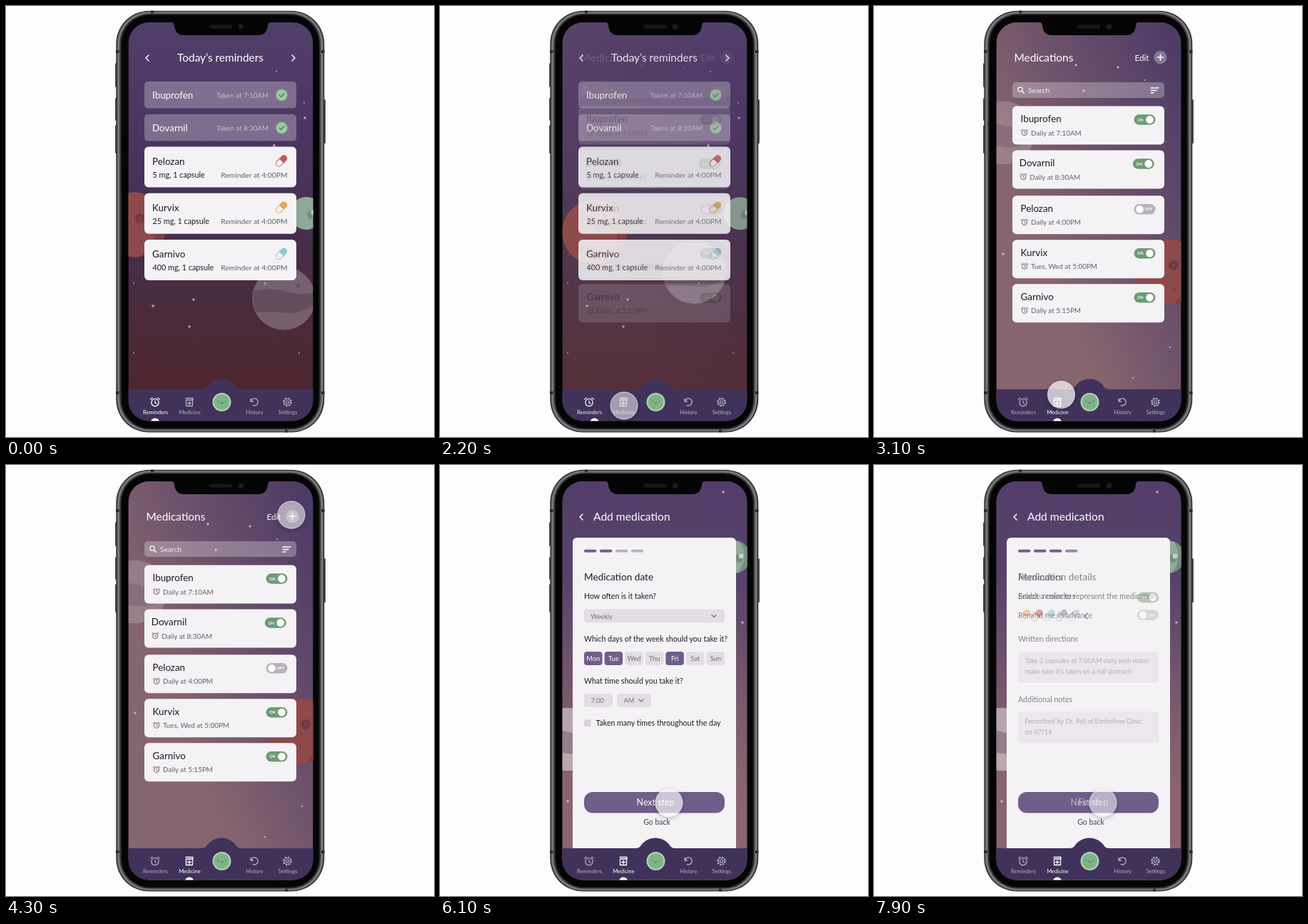
Animation, 600 px wide and 605 px high, one loop 8 s. Source, as an HTML page:

```html
<!DOCTYPE html>
<html lang="en">
<head>
<meta charset="utf-8">
<title>Medication reminders</title>
<style>
html, body { margin: 0; width: 100%; height: 100%; overflow: hidden; background: #fefcfe; }
svg { display: block; width: 600px; height: 605px; font-family: Lato, "Open Sans", sans-serif; }
.line { fill: none; stroke-linecap: round; stroke-linejoin: round; }
</style>
</head>
<body>
<svg id="stage" viewBox="0 0 600 605"></svg>
<script>
const PURPLE = '#715d8b', INK = '#1f1b22', GREY = '#655f69', FIELD = '#e3dde4', CARD = '#f4f2f5';

// Drawing helpers, each returning markup
const text = (x, y, s, size, fill = INK, extra = '') =>
  `<text x="${x}" y="${y}" font-size="${size}" fill="${fill}" ${extra}>${s}</text>`;
const mid = 'text-anchor="middle"', end = 'text-anchor="end"';
const box = (x, y, w, h, r, fill, extra = '') =>
  `<rect x="${x}" y="${y}" width="${w}" height="${h}" rx="${r}" fill="${fill}" ${extra}/>`;
const dot = (x, y, r, fill, extra = '') =>
  `<circle cx="${x}" cy="${y}" r="${r}" fill="${fill}" ${extra}/>`;
const line = (d, color, w = 1.2) =>
  `<path class="line" d="${d}" stroke="${color}" stroke-width="${w}"/>`;
const at = (x, y, body, extra = '') => `<g transform="translate(${x} ${y}) ${extra}">${body}</g>`;
const group = (id, body) => `<g id="${id}">${body}</g>`;

const chevron = (x, y, dir, color = '#fff') =>
  line(`M${x - 2 * dir} ${y - 4}l${4 * dir} 4l${-4 * dir} 4`, color, 1.5);
const drop = (x, y) => line(`M${x - 3} ${y - 1.5}l3 3l3-3`, '#716a76', 1.1);
const pill = (x, y, color) => at(x, y,
  line('M-4.2-1V5a4.2 4.2 0 0 0 8.4 0V-1', color, 1) +
  `<path d="M-4.7 0V-5a4.7 4.7 0 0 1 9.4 0V0z" fill="${color}"/>`, 'rotate(45)');
const alarm = (x, y, color, k = 1) => at(x, y,
  dot(0, .5, 4.7, 'none', `stroke="${color}" stroke-width="1.2"`) +
  line('M0-2V1L2 2M-6-3.3L-3.5-5.5M6-3.3L3.5-5.5', color, 1.1), `scale(${k})`);
const toggle = (x, y, on) => box(x, y - 7.2, 30, 14.4, 7.2, on ? '#6f9a76' : '#b7b2ba') +
  dot(on ? x + 22 : x + 8, y, 5.4, '#fff') +
  text(on ? x + 9 : x + 20.5, y + 2, on ? 'ON' : 'OFF', 5.4, '#fff', mid + ' font-weight="700"');
const field = (x, y, w, s, h = 18.7) => box(x, y, w, h, 4, FIELD) + text(x + 9.5, y + 13, s, 9.2, '#777079');
const title = s => text(202, 162, s, 13.6);
const label = (y, s, size = 10.6) => text(202, y, s, size);
const stars = list => list.map(([x, y, r = 1.4]) => dot(x, y, r, '#d8c9dc', 'opacity=".75"')).join('');
const gradient = (id, dir, ...stops) => `<linearGradient id="${id}" ${dir}>` +
  stops.map((c, i) => `<stop offset="${i / (stops.length - 1)}" stop-color="${c}"/>`).join('') + '</linearGradient>';
const screen = fill => box(171.5, 23, 259, 560, 0, `url(#${fill})`);

const meds = ['Ibuprofen', 'Dovarnil', 'Pelozan', 'Kurvix', 'Garnivo'];

// Reminders screen
const taken = (i, time) => {
  const y = 106 + 46 * i;
  return box(194, y, 213, 37.6, 5, '#fff', 'fill-opacity=".28"') + text(205, y + 24, meds[i], 13.4, '#fff') +
    text(368, y + 23, 'Taken at ' + time, 9.75, '#cabfd0', end) + dot(386.5, y + 19, 8, '#9dc8a2') +
    line(`M383 ${y + 19}l2.5 2.7l4.8-5`, '#43634f', 1.1);
};
const due = (i, dose, color) => {
  const y = 197.5 + 65.2 * (i - 2);
  return box(194, y, 213, 57, 6, CARD) + text(205, y + 25, meds[i], 13.4) +
    text(205.5, y + 43.5, dose + ', 1 capsule', 10.8) +
    text(394.5, y + 43.5, 'Reminder at 4:00PM', 10.3, GREY, end) + pill(386, y + 20, color);
};
const reminders = chevron(198, 73, -1) + chevron(403, 73, 1) +
  text(300.5, 78, 'Today’s reminders', 15.4, '#fff', mid) +
  taken(0, '7:10AM') + taken(1, '8:30AM') +
  due(2, '5 mg', '#c6575c') + due(3, '25 mg', '#e3a95f') + due(4, '400 mg', '#96c6cd');

// Medication list
const schedule = ['Daily at 7:10AM', 'Daily at 8:30AM', 'Daily at 4:00PM', 'Tues, Wed at 5:00PM', 'Daily at 5:15PM'];
const medicine = text(196.5, 78, 'Medications', 15.4, '#fff') + text(365.5, 76.5, 'Edit', 11.7, '#fff') +
  dot(401.5, 72, 9.2, '#fff', 'fill-opacity=".3"') + line('M397.5 72h8M401.5 68v8', '#fff', 1.6) +
  box(194, 107, 213, 22, 5, '#fff', 'fill-opacity=".28"') +
  dot(205, 117, 3.2, 'none', 'stroke="#fff" stroke-width="1.3"') + line('M207.5 119.5l3 3', '#fff', 1.4) +
  text(216, 122, 'Search', 10.3, '#f2edf4') + line('M388 115h11M388 118.5h8M388 122h4', '#fff', 1.3) +
  [140.5, 202.5, 266.3, 328.2, 390.3].map((y, i) => {
    const dx = i == 1 ? -1.7 : 0;
    return box(194, y, 213, 54, 6, CARD) + text(205.5 + dx, y + 22.6, meds[i], 13.4) +
      alarm(211 + dx, y + 37, GREY, .8) + text(220 + dx, y + 41, schedule[i], 9.9, GREY) +
      toggle(364.5 + dx, y + 19, i != 2);
  }).join('');

// Add-medication wizard
const step = [
  title('Medication name') + label(188, 'What’s the name of your medication?') + field(202, 202.5, 197, 'Acetaminophen') +
  label(248, 'How much medication should you take?') +
  field(202, 262.5, 37, '2') + field(246, 262.5, 78, 'Capsules') + drop(312, 272),

  title('Medication date') + label(188, 'How often is it taken?') + field(202, 202.5, 197, 'Weekly') + drop(384, 212) +
  label(248, 'Which days of the week should you take it?') +
  ['Mon', 'Tue', 'Wed', 'Thu', 'Fri', 'Sat', 'Sun'].map((d, i) => {
    const on = [0, 1, 4].includes(i), x = 202 + 28.6 * i;
    return box(x, 262, 25.5, 19, 4, on ? PURPLE : FIELD) + text(x + 12.7, 275, d, 9.2, on ? '#fff' : '#777079', mid);
  }).join('') +
  label(306.5, 'What time should you take it?') + field(202, 321, 40, '7:00') + field(248, 321, 48, 'AM') + drop(282, 330.5) +
  box(202, 357.5, 9.5, 9.5, 2, '#d9d2dc') + text(218.5, 365.5, 'Taken many times throughout the day', 10.6),

  title('Medication details') + label(188, 'Select a color to represent the medication') +
  ['#e3a95f', '#c6575c', '#96c6cd', '#8f8a92', '#b9b4bc'].map((c, i) => pill(211 + 17.3 * i, 211, c)).join('') +
  chevron(297, 212, -1, GREY) +
  label(248, 'Written directions') + box(202, 262, 197, 44, 4, FIELD) +
  text(211.5, 278, 'Take 2 capsules at 7:00AM daily with water,', 9.2, '#777079') +
  text(211.5, 293, 'make sure it’s taken on a full stomach', 9.2, '#777079') +
  label(332.5, 'Additional notes') + box(202, 346, 197, 44, 4, FIELD) +
  text(211.5, 362.5, 'Prescribed by Dr. Pell at Elmhollow Clinic', 9.2, '#777079') + text(211.5, 377.5, 'on 07/14', 9.2, '#777079'),

  title('Reminders') + label(188, 'Enable reminders') + toggle(369, 186, true) +
  label(214.5, 'Remind me in advance') + toggle(369, 210.5, false)
];
const dash = (i, fill, extra) => box(202 + 22 * i, 118.7, 17.3, 3.8, 1.9, fill, extra);
const wizard = chevron(198, 73, -1) + text(215, 78, 'Add medication', 15.6, '#fff') +
  box(186, 102, 229, 450, 6, CARD) + [0, 1, 2, 3].map(i => dash(i, '#b5b1b7') + dash(i, PURPLE, `id="dash${i}"`)).join('') +
  box(202, 459, 197, 29.5, 12, PURPLE) + step.map((s, i) => group('step' + i, s)).join('') +
  group('next', text(302, 477.5, 'Next step', 12.4, '#fff', mid)) +
  group('finish', text(302, 477.5, 'Finish', 12.4, '#fff', mid)) +
  group('back', text(304, 505, 'Go back', 10.5, '#49434d', mid));

// Bottom bar
const tab = (id, x, name, icon) => group(id, at(x, 556, icon) + text(x + .5, 573, name, 7.6, '#fff', mid));
const nav = `<path d="M171 538H274Q279 538 281 535A25 25 0 0 1 323 535Q325 538 330 538H431V584H171z" fill="#40325a"/>` +
  tab('tab0', 209, 'Reminders', alarm(0, 0, '#fff', 1.1)) +
  tab('tab1', 257, 'Medicine', line('M-5-5.5H5M-4.5-3H4.5V5.5H-4.5zM0-1V4M-2.5 1.5H2.5M5-5.5V-3', '#fff', 1.3)) +
  tab('tab2', 348, 'History', line('M-5-4.5V-1H-1.5M-4.7-1.2A5 5 0 1 1-2 4.5', '#fff', 1.3)) +
  tab('tab3', 394.5, 'Settings', dot(0, 0, 2, 'none', 'stroke="#fff" stroke-width="1.1"') +
    dot(0, 0, 4.5, 'none', 'stroke="#fff" stroke-width="1.2"') +
    dot(0, 0, 5.6, 'none', 'stroke="#fff" stroke-width="1.6" stroke-dasharray="2.2 2.2"')) +
  dot(302.5, 556, 13, '#b3d0b6') + dot(302.5, 556, 10.8, '#80b389') +
  dot(297.5, 555, .7, '#2f5140') + dot(307.5, 555, .7, '#2f5140') + line('M300.5 557q2 1.5 4 0', '#2f5140', .8) +
  group('mark', dot(0, 584.5, 6, '#fff'));

// Planets, drawn around their own centres
const planets =
  group('red', dot(0, 0, 45.5, '#8d4a4b') + '<path d="M22-39.8A45.5 45.5 0 0 1 8 44.8Q48 10 22-39.8z" fill="#7b3e46"/>' +
    dot(8, -9, 7.5, '#7b3e46') + dot(8, -9, 4.5, 'none', 'stroke="#623039"') + dot(-20, 22, 5, '#7b3e46') + dot(9, 24, 1.5, '#7b3e46')) +
  group('green', dot(0, 0, 23, '#91a99a') + '<path d="M8-21.5A23 23 0 0 1 6 22Q22 0 8-21.5z" fill="#738f81"/>' +
    dot(7, 2, 6, '#738f81') + dot(10, -1, 3.4, '#c0d2c4')) +
  group('moon', dot(0, 0, 44.3, '#fff', 'fill-opacity=".6"') +
    '<path d="M-42-11Q-18-16 2-10T43-8L43 9Q22 23 2 20T-39 20Q-45 6-42-11z" fill="#4a3447" fill-opacity=".38"/>' +
    dot(20, -18, 3, '#4a3447', 'fill-opacity=".35"') + dot(-26, -20, 1.4, '#fff'));

// Phone hardware: metal rim shaded from the outside in, then the black bezel
const metal = '#4a4a4d';
const rim = ['#2f2f31', '#5b5b5e', '#838387', '#68686b', '#3d3d40', '#1d1d1f', '#050506'];
const phone = [[153, 80, 34], [153, 129, 32], [153, 167, 40]].map(([x, y, h]) => box(x, y, 4, h, 1.5, metal)).join('') +
  box(444, 131, 4, 62, 1.5, metal) +
  rim.map((c, i) => box(154.3 + 1.3 * i, 6.8 + i, 292 - 2.6 * i, 591.8 - 2 * i, 46 - i, c)).join('') +
  [[154, 62], [442, 62], [154, 541], [442, 541]].map(([x, y]) => box(x, y, 4.5, 4, 0, '#2a2a2c')).join('') +
  box(203, 6.5, 4, 3.5, 0, '#2a2a2c') + box(391, 595, 4, 3.5, 0, '#2a2a2c');
const notch = '<path d="M229 22Q235 22 236 27Q237 41 250 41H353Q366 41 367 27Q368 22 374 22z" fill="#050506"/>' +
  box(285, 26.5, 32, 5, 2.5, '#19191b') + dot(329.5, 29, 4, '#14151f') + dot(329.5, 29, 1.6, '#262a4a');

const stage = document.getElementById('stage');
stage.innerHTML = '<defs>' +
  gradient('skyA', 'x1="0" y1="0" x2="0" y2="1"', '#523e6b', '#4c3663', '#45304f', '#4a2a3a', '#4e2429') +
  gradient('skyB', 'x1="1" y1=".1" x2=".35" y2=".7"', '#4e3b66', '#6a4f6b', '#87656f') +
  gradient('skyC', 'x1="0" y1="0" x2="0" y2="1"', '#523e69', '#58426a', '#74566c', '#89646f', '#8b6570') +
  '<clipPath id="view"><rect x="171.5" y="23" width="259" height="559.5" rx="29"/></clipPath>' +
  '<filter id="soft" x="-40%" y="-40%" width="180%" height="180%"><feGaussianBlur stdDeviation="2"/></filter></defs>' +
  phone + '<g clip-path="url(#view)">' +
  group('bg0', screen('skyA')) + group('bg1', screen('skyB')) + group('bg2', screen('skyC')) + planets +
  group('stars0', stars([[379, 92, 1], [418, 136, 1], [419, 157, 1.7], [376, 196, 1.9], [206, 421, 1.8], [263, 412, 1.8],
    [257, 450, 1.7], [179, 389, 1], [179, 487, 1], [411, 487, 1], [363, 389, 1]])) +
  group('stars1', stars([[283, 83, 1.7], [342, 86, 1.7], [380, 104, 1], [294, 119, 1.7], [181, 348, 1.7], [415, 479, 1.2], [363, 522, 1.2]])) +
  group('stars2', stars([[397, 38, 1.8], [424, 221, 1.8], [179, 472, 1.8]])) +
  group('page0', reminders) + group('page1', medicine) + group('page2', wizard) + nav + notch + '</g>' +
  group('cursor', dot(0, 2, 19.5, 'none', 'stroke="#20142c" stroke-opacity=".3" stroke-width="2" filter="url(#soft)"') +
    dot(0, 0, 19, '#fff', 'id="touch" stroke="#fff" stroke-opacity=".55" stroke-width="1.3"'));

const $ = id => document.getElementById(id);
const mix = (a, b, p) => a + (b - a) * p;
const fade = (id, v) => $(id).setAttribute('opacity', v);
const place = (id, x, y) => $(id).setAttribute('transform', `translate(${x} ${y})`);
const ramp = (t, start, length) => {
  const p = Math.min(1, Math.max(0, (t - start) / length));
  return p * p * (3 - 2 * p);
};

// x, y, opacity on each of the three pages
const orbit = {
  red: [[180, 307, 1], [412, 373, 1], [485, 440, 0]],
  green: [[421, 291, 1], [418, 292, 0], [412, 129, 1]],
  moon: [[389.5, 410.5, .42], [181, 178, .3], [179, 385, .75]]
};
// start, length, x, y, sideways bend
const moves = [[1000, 650, 258, 561, 0], [3000, 950, 400, 70, 0], [4650, 850, 321, 474, 11]];
const taps = [1980, 4330, 5620, 6670, 7680];

function render(t) {
  const a = ramp(t, 2050, 600), b = ramp(t, 4400, 500);
  fade('bg1', a); fade('bg2', b);
  [1 - a, a * (1 - b), b].forEach((v, i) => { fade('page' + i, v); fade('stars' + i, v); });
  for (const id in orbit) {
    const [p, q, r] = orbit[id];
    const [x, y, o] = p.map((v, i) => mix(mix(v, q[i], a), r[i], b));
    place(id, x, y); fade(id, o);
  }
  fade('tab0', mix(1, .6, a)); fade('tab1', mix(.6, 1, a));
  fade('tab2', .62); fade('tab3', .62);
  place('mark', mix(209, 257, a), 0);

  const s = [1, ramp(t, 5680, 300), ramp(t, 6720, 300), ramp(t, 7755, 300), 0];
  for (let i = 0; i < 4; i++) {
    fade('step' + i, s[i] * (1 - s[i + 1]));
    fade('dash' + i, s[i]);
  }
  fade('next', 1 - s[3]); fade('finish', s[3]); fade('back', s[1]);

  let x = 640, y = 567;
  for (const [start, length, toX, toY, bend] of moves) {
    const p = ramp(t, start, length);
    x = mix(x, toX, p) - bend * Math.sin(Math.PI * p);
    y = mix(y, toY, p);
  }
  place('cursor', x, y);
  const press = Math.max(...taps.map(k => ramp(t, k - 120, 120) * (1 - ramp(t, k + 350, 200))));
  $('touch').setAttribute('fill-opacity', mix(.7, .52, press));
}

function frame(now) {
  render(now % 8000);
  requestAnimationFrame(frame);
}
requestAnimationFrame(frame);
</script>
</body>
</html>
```
